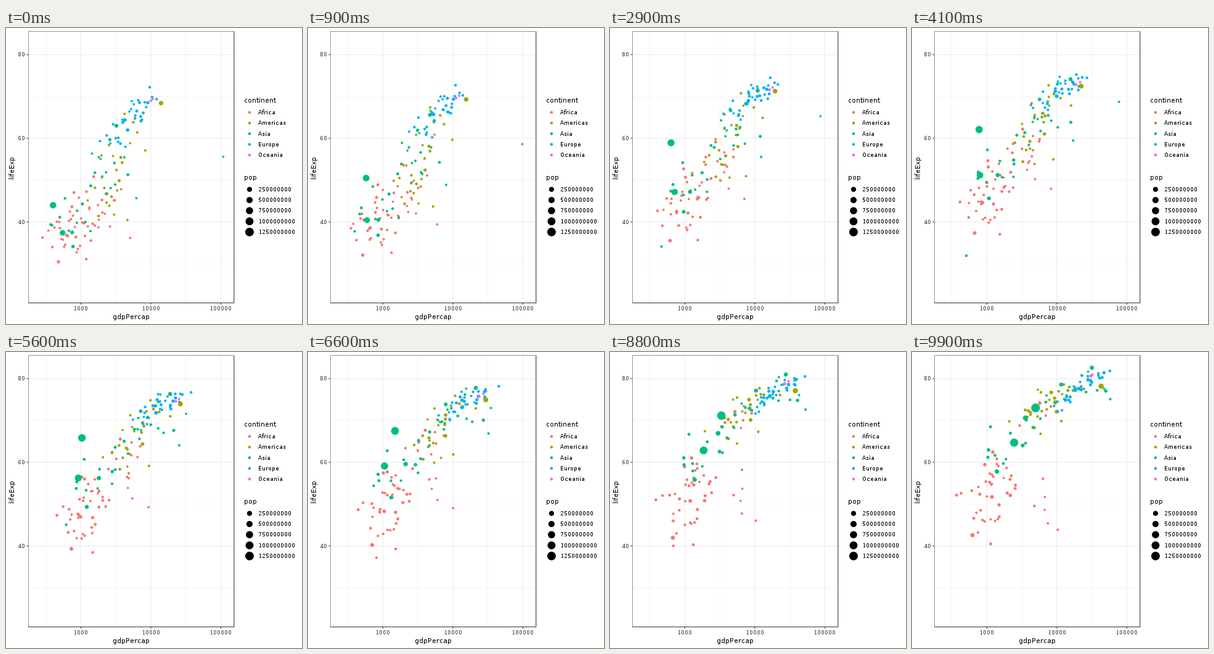
A matplotlib script for the animation above (10 s loop, 480 px wide and 480 px high).

```python
import numpy as np
import matplotlib.pyplot as plt
from matplotlib.animation import FuncAnimation

plt.rcParams.update({
    "font.family": "DejaVu Sans",
    "text.hinting": "no_autohint",
    "text.hinting_factor": 1,       # whole-pixel letter advances
})

SIZE, DPI = 480, 100
PX = 72 / DPI                       # points per pixel
FRAMES, INTERVAL = 100, 100
YEARS = np.arange(1952, 2008, 5)
T = np.linspace(0, 1, len(YEARS))

LEFT, RIGHT, TOP, BOTTOM = 36.2, 369.8, 5.5, 445.8
X_LIM = (2.2487, 5.1887)            # log10 of gdpPercap
Y_LIM = (20.649, 85.553)
POP_MIN, POP_MAX = 0.06, 1318.7     # millions

COLORS = {
    "Africa": "#F8766D",
    "Americas": "#A3A500",
    "Asia": "#00BF7D",
    "Europe": "#00B0F6",
    "Oceania": "#E76BF3",
}
INK, GRID, LABEL = "#333333", "#EBEBEB", "#4D4D4D"

rng = np.random.default_rng(7)
dots = []                           # (colour, log gdp, life, diameter)


def px_x(log_gdp):
    return LEFT + (log_gdp - X_LIM[0]) / (X_LIM[1] - X_LIM[0]) * (RIGHT - LEFT)


def px_y(life):
    return BOTTOM - (life - Y_LIM[0]) / (Y_LIM[1] - Y_LIM[0]) * (BOTTOM - TOP)


def diameter(size):
    return (size * 2.845 + 0.94) * 0.75 + 0.71


def pop_diameter(pop):
    share = np.clip((pop - POP_MIN) / (POP_MAX - POP_MIN), 0, 1)
    return diameter(1 + 5 * np.sqrt(share))


def add_dot(continent, log_gdp, life, pops):
    pop = np.geomspace(*pops, len(YEARS))
    dots.append((COLORS[continent], log_gdp, life, pop_diameter(pop)))


def track(continent, pops, *points):
    """One standout dot through a few (year, gdp, life) points."""
    year, gdp, life = np.array(points, float).T
    add_dot(continent, np.interp(YEARS, year, np.log10(gdp)),
            np.interp(YEARS, year, life), pops)


def spread(n):
    """Evenly filled bell curve, shuffled."""
    z = np.clip(rng.normal(size=4000), -2.1, 2.1)
    return rng.permutation(np.quantile(z, (np.arange(n) + 0.5) / n))


def cloud(continent, n, gdp, life, sx, sy, slope=5, hump=2, pop=4, growth=3):
    """Dots around a centre that rises quickly first, then levels off."""
    bow = np.sin(np.pi * T)
    cx = np.linspace(*np.log10(gdp), len(T)) + 0.08 * bow
    cy = np.linspace(*life, len(T)) + hump * bow
    sd = np.linspace(*sy, len(T))
    for u, v, du, dv, p in zip(*(spread(n) for _ in range(5))):
        walk = np.cumsum(rng.normal(0, 0.02, len(T)))
        dx = sx * (u * (1 - 0.25 * T) + 0.4 * du * T) + walk - walk[0]
        dy = sd * (v * (1 - 0.2 * T) + 0.5 * dv * T) + slope * dx
        start = pop * np.exp(1.1 * p)
        add_dot(continent, cx + dx, np.minimum(cy + dy, 82),
                (start, start * growth))


# Low-income, southern and northern Africa
cloud("Africa", 38, (820, 1150), (38.7, 53), 0.22, (4, 6.2))
cloud("Africa", 7, (2600, 7000), (42, 50), 0.20, (4, 4.5), slope=0, hump=9, pop=1.5)
cloud("Africa", 6, (1900, 6500), (45, 73), 0.14, (4.5, 1.4))
# Lower and higher incomes elsewhere
cloud("Americas", 12, (2400, 4900), (46, 71.5), 0.16, (4.5, 3), slope=8)
cloud("Americas", 12, (4000, 11500), (58, 76), 0.18, (4.5, 2))
cloud("Asia", 8, (720, 1500), (40, 62.5), 0.18, (4, 4), pop=10)
cloud("Asia", 10, (1900, 5500), (50, 72.5), 0.20, (5.5, 3), pop=6)
cloud("Asia", 9, (3000, 25000), (54, 77.5), 0.20, (6, 2.2), slope=4, pop=3)
cloud("Europe", 13, (3700, 13500), (61.5, 75), 0.17, (2.3, 1.3), 9, 3, 7, 1.3)
cloud("Europe", 17, (7200, 31000), (67.6, 79.6), 0.12, (1.8, 0.8), 9, 0, 8, 1.3)
cloud("Oceania", 2, (10300, 30000), (69.2, 80.7), 0.02, (0.2, 0.5), hump=-1)

track("Africa", (2.5, 8.9), (1952, 493, 40), (1987, 848, 44),
      (1992, 737, 23.6), (1997, 590, 36.1), (2007, 863, 46.2))
track("Americas", (158, 301), (1952, 13990, 68.4), (2007, 42952, 78.2))
track("Asia", (0.16, 2.5), (1952, 108382, 55.6), (1967, 80895, 64.6),
      (1972, 109348, 67.7), (1982, 31354, 71.3), (2007, 47307, 77.6))
track("Asia", (4.7, 14), (1952, 368, 39.4), (1977, 525, 31.2),
      (1987, 684, 53.9), (2007, 1714, 59.7))
track("Asia", (82, 224), (1952, 750, 37.5), (2007, 3541, 70.6))
track("Asia", (86, 127), (1952, 3217, 63), (1972, 14779, 73.4),
      (2007, 31656, 82.6))
track("Asia", (372, 1110), (1952, 547, 37.4), (1987, 977, 58.6),
      (2007, 2452, 64.7))
track("Asia", (556, 1319), (1952, 400, 44), (1957, 576, 50.5),
      (1962, 488, 44.5), (1967, 613, 58.4), (1982, 962, 65.5),
      (2007, 4959, 73))

fig = plt.figure(figsize=(SIZE / DPI, SIZE / DPI), dpi=DPI, facecolor="white")
ax = fig.add_axes([0, 0, 1, 1])
ax.set(xlim=(0, SIZE), ylim=(SIZE, 0))
ax.axis("off")


def line(xs, ys, color, width, z=1):
    ax.plot(xs, ys, color=color, lw=width * PX, zorder=z, snap=False,
            solid_capstyle="butt")


def label(x, y, text, size=8.8, color="black", **kw):
    ax.text(x, y, text, fontsize=size * PX, color=color, va="baseline", **kw)


def scatter(xs, ys, diameters, colors):
    return ax.scatter(xs, ys, s=(np.asarray(diameters) * PX) ** 2, c=colors,
                      linewidths=0, zorder=3)


# Grid and axes
for v in (2.5, 3.5, 4.5):
    line([px_x(v)] * 2, [TOP, BOTTOM], GRID, 0.53)
for v in (30, 50, 70):
    line([LEFT, RIGHT], [px_y(v)] * 2, GRID, 0.53)
for v in (3, 4, 5):
    x = px_x(v)
    line([x, x], [TOP, BOTTOM], GRID, 1.07)
    line([x, x], [BOTTOM, BOTTOM + 2.75], INK, 1.07)
    label(x, 458, str(10 ** v), color=LABEL, ha="center")
for v in (40, 60, 80):
    y = px_y(v)
    line([LEFT, RIGHT], [y, y], GRID, 1.07)
    line([LEFT - 2.75, LEFT], [y, y], INK, 1.07)
    label(31.3, y + 3.3, str(v), color=LABEL, ha="right")

# Panel border: the left and top edges show only their inner half
line([LEFT + 0.27] * 2, [TOP, BOTTOM], INK, 0.53, 4)
line([LEFT, RIGHT], [TOP + 0.27] * 2, INK, 0.53, 4)
line([RIGHT, RIGHT, LEFT], [TOP, BOTTOM, BOTTOM], INK, 1.07, 4)

label((LEFT + RIGHT) / 2, 472, "gdpPercap", 11, ha="center")
label(13.5, (TOP + BOTTOM) / 2, "lifeExp", 11, ha="center",
      rotation=90, rotation_mode="anchor")


def legend(top, title, names, diameters, colors):
    label(386.2, top, title, 11)
    ys = top + 15.9 + 17.28 * np.arange(len(names))
    scatter(np.full(len(names), 394.9), ys, diameters, colors)
    for y, name in zip(ys, names):
        label(409, y + 3.2, name)


pops = 250 * np.arange(1, 6)
legend(121, "continent", list(COLORS), np.full(5, diameter(1.5)),
       list(COLORS.values()))
legend(245.8, "pop", [f"{p}000000" for p in pops], pop_diameter(pops),
       ["black"] * 5)

colors, log_gdp, life, D = zip(*dots)
X, Y, D = px_x(np.array(log_gdp)), px_y(np.array(life)), np.array(D)
points = scatter(X[:, 0], Y[:, 0], D[:, 0], colors)


def update(frame):
    pos = frame / (FRAMES - 1) * (len(YEARS) - 1)
    i = min(int(pos), len(YEARS) - 2)
    f = pos - i
    x, y, d = (a[:, i] * (1 - f) + a[:, i + 1] * f for a in (X, Y, D))
    points.set_offsets(np.column_stack([x, y]))
    points.set_sizes((d * PX) ** 2)
    return (points,)


anim = FuncAnimation(fig, update, frames=FRAMES, interval=INTERVAL,
                     repeat=True, repeat_delay=0)
plt.show()
```
